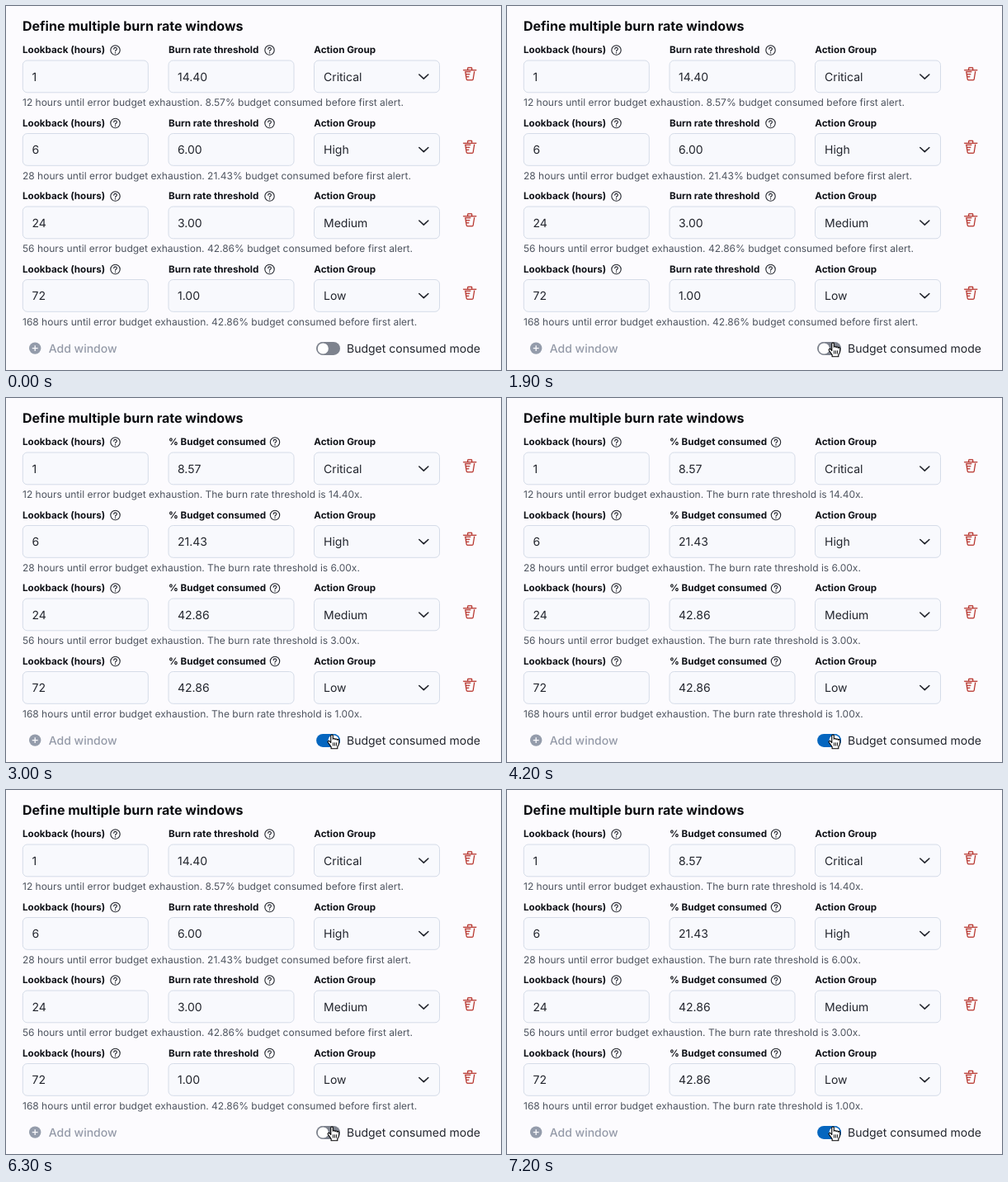
Write an HTML page that moves like this. It is 600 by 441 pixels and loops after 8 s.

```html
<!DOCTYPE html>
<html lang="en">
<head>
<meta charset="utf-8">
<title>Burn rate windows</title>
<style>
  html, body { margin: 0; width: 100%; height: 100%; overflow: hidden; background: #fcfbfe; }
  svg { display: block; width: 600px; height: 441px; }
  text { font-family: Inter, "Liberation Sans", sans-serif; font-size: 14px; fill: #22252d; white-space: pre; text-rendering: geometricPrecision; }
  .title { font-size: 16px; font-weight: 700; fill: #0b0c10; }
  .label { font-size: 11.65px; font-weight: 700; fill: #101218; }
  .help { font-size: 12px; fill: #4e545f; }
  .box { fill: #f8f9fd; stroke: #d5dce8; }
  .line { fill: none; stroke: #22252d; stroke-linecap: round; stroke-linejoin: round; }
</style>
</head>
<body>
<svg id="stage" viewBox="0 0 600 441" xmlns="http://www.w3.org/2000/svg">
  <defs>
    <g id="info">
      <circle class="line" r="5.7" stroke-width="1.1"/>
      <path class="line" d="M-1.8-1.3C-1.8-3.7 1.9-3.7 1.9-1.4 1.9 0 0-.1 0 1.3" stroke-width="1.1"/>
      <circle cy="3.2" r=".75" fill="#22252d"/>
    </g>
    <path id="trash" fill="#b0241c" stroke="#b0241c" stroke-width=".2" d="M11 3h5v1H0V3h5V1a1 1 0 0 1 1-1h4a1 1 0 0 1 1 1v2Zm-7.056 8H7v1H4.1l.392 2.519c.042.269.254.458.493.458h6.03c.239 0 .451-.189.493-.458l1.498-9.576H14l-1.504 9.73c-.116.747-.74 1.304-1.481 1.304h-6.03c-.741 0-1.365-.557-1.481-1.304l-1.511-9.73H9V5.95H3.157L3.476 8H8v1H3.632l.312 2ZM6 3h4V1H6v2Z"/>
  </defs>
  <rect width="600" height="441" fill="#fcfbfe"/>
  <text class="title" x="20" y="30.3">Define multiple burn rate windows</text>
  <g id="rows"></g>

  <circle cx="35.2" cy="414.6" r="7.2" fill="#949cab"/>
  <path d="M31.8 414.6h6.8m-3.4-3.4v6.8" stroke="#fcfbfe" stroke-width="1.3"/>
  <text x="51.7" y="419.8" style="font-weight:500;fill:#949aa8">Add window</text>

  <rect id="track" x="376.1" y="407" width="28.9" height="15.9" rx="7.95"/>
  <circle id="thumb" cy="415" r="7.2" fill="#fff" stroke-width="1.3"/>
  <text x="413" y="419.8">Budget consumed mode</text>

  <g id="cursor">
    <g id="hand" stroke="#000" stroke-width="1.1" stroke-linejoin="round" stroke-linecap="round">
      <path fill="#fff" d="M4.6 10.5 3.3 8.9C2 7.5.2 8.6 1.1 10.1L4.9 15.4V17.6H12.6V15.5C13.7 14 14.5 12.6 14.5 10.5V7.6C14.5 6.1 12.4 6 12.2 7.2 12.2 5.6 9.8 5.4 9.6 6.6 9.5 5 7.3 5 7.1 6.1V2C7.1.3 4.5.3 4.5 2Z"/>
      <path fill="none" stroke-width=".9" d="M7.3 10.6v3.4M9.3 10.6v3.4M11.3 10.6v3.4"/>
    </g>
    <path id="arrow" fill="#000" stroke="#fff" d="M5 0v14.2l3.3-3.1 2.2 5 2.2-1-2.1-4.8h4.4Z"/>
  </g>
</svg>
<script>
const LOOP = 8000, STEP = 100, SLIDE = 300, PITCH = 88.5;
const TOGGLES = [2000, 4300, 6500];
const ENTER = { from: 800, to: 1300, start: [424, 426], end: [389.2, 407.2] };
const WINDOWS = [
  { hours: 1, left: 12, rate: '14.40', budget: '8.57', group: 'Critical' },
  { hours: 6, left: 28, rate: '6.00', budget: '21.43', group: 'High' },
  { hours: 24, left: 56, rate: '3.00', budget: '42.86', group: 'Medium' },
  { hours: 72, left: 168, rate: '1.00', budget: '42.86', group: 'Low' },
];
const $ = id => document.getElementById(id);
const field = x => `<rect class="box" x="${x + .5}" y="66" width="152" height="38.8" rx="5.5"/>`;

$('rows').innerHTML = WINDOWS.map((w, i) => `
  <g transform="translate(0 ${i * PITCH})">
    <text class="label" x="20" y="57">Lookback (hours)</text>
    <use href="#info" x="132.5" y="53.5"/>
    <text class="label" x="197" y="57" data-part="label"></text>
    <use href="#info" y="53.5" data-part="info"/>
    <text class="label" x="373.3" y="57.4">Action Group</text>
    ${field(19.8)}${field(196.5)}${field(373)}
    <text x="31.5" y="90.8">${w.hours}</text>
    <text x="208" y="90.8" data-part="value"></text>
    <text x="385" y="90.6">${w.group}</text>
    <path class="line" d="M500.8 83l5.5 5.2 5.5-5.2" stroke-width="1.6"/>
    <use href="#trash" transform="translate(554.2 74.2)"/>
    <text class="help" x="20" y="121.4" data-part="help"></text>
  </g>`).join('');

const rows = [...$('rows').children].map(g =>
  Object.fromEntries([...g.querySelectorAll('[data-part]')].map(n => [n.dataset.part, n])));

const clamp = v => Math.min(1, Math.max(0, v));
const mix = (a, b, p) => a + (b - a) * p;
const easeOut = p => 1 - (1 - p) ** 3;
const easeBack = p => 1 + 2.2 * (p - 1) ** 3 + 1.2 * (p - 1) ** 2;
const OFF = [125, 130, 141], ON = [5, 102, 191];

let shownMode = null;
function showMode(budgetMode) {
  if (budgetMode === shownMode) return;
  shownMode = budgetMode;
  rows.forEach((row, i) => {
    const w = WINDOWS[i];
    row.label.textContent = budgetMode ? '% Budget consumed' : 'Burn rate threshold';
    row.info.setAttribute('x', budgetMode ? 326 : 319.5);
    row.value.textContent = budgetMode ? w.budget : w.rate;
    row.help.textContent = `${w.left} hours until error budget exhaustion. ` +
      (budgetMode ? `The burn rate threshold is ${w.rate}x.` : `${w.budget}% budget consumed before first alert.`);
  });
}

function drawSwitch(on, p) {
  const pos = on ? easeBack(p) : 1 - easeBack(p);
  const tint = on ? p : 1 - p;
  const color = `rgb(${OFF.map((c, i) => Math.round(mix(c, ON[i], tint)))})`;
  $('track').setAttribute('fill', color);
  $('thumb').setAttribute('stroke', color);
  $('thumb').setAttribute('cx', mix(384.3, 397, pos));
}

function drawCursor(t) {
  const p = easeOut(clamp((t - ENTER.from) / (ENTER.to - ENTER.from)));
  const [x, y] = ENTER.start.map((v, i) => mix(v, ENTER.end[i], p));
  const overSwitch = y < 419;
  $('cursor').setAttribute('visibility', t < ENTER.from ? 'hidden' : 'visible');
  $('cursor').setAttribute('transform', `translate(${x} ${y})`);
  $('hand').setAttribute('display', overSwitch ? 'inline' : 'none');
  $('arrow').setAttribute('display', overSwitch ? 'none' : 'inline');
}

function render(t) {
  const past = TOGGLES.filter(start => t >= start);
  const on = past.length % 2 === 1;
  showMode(on);
  drawSwitch(on, past.length ? clamp((t - past.at(-1)) / SLIDE) : 1);
  drawCursor(t);
}

const begin = performance.now();
function tick() {
  const t = (performance.now() - begin) % LOOP;
  render(Math.floor(t / STEP) * STEP);
  requestAnimationFrame(tick);
}
tick();
</script>
</body>
</html>
```
